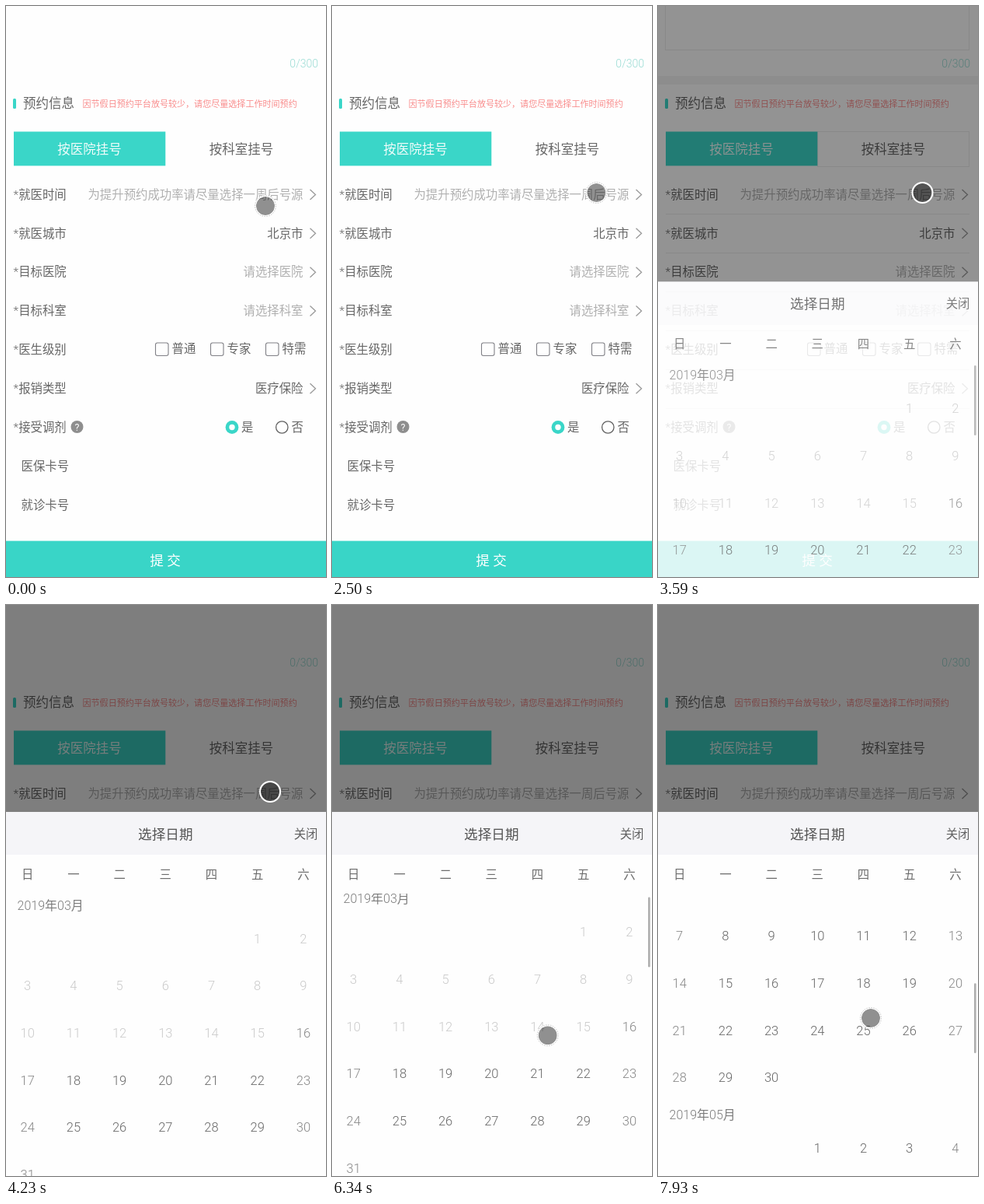
These frames come from a looping animation (412x734 px, 8000 ms). An HTML page with a canvas:

```html
<!DOCTYPE html>
<html lang="zh-CN">
<head>
<meta charset="utf-8">
<title>预约挂号</title>
<style>
html, body { margin: 0; width: 100%; height: 100%; overflow: hidden; background: #fefefe; }
canvas { display: block; width: 412px; height: 734px; }
</style>
</head>
<body>
<canvas id="stage"></canvas>
<script>
const W = 412, H = 734, LOOP = 8000, STEP = 132, OPEN = 3440;
const TEAL = '#3ad6c8', INK = '#666', HINT = '#b0b0b0';
const FONT = 'Roboto, "Noto Sans CJK SC Light", "Noto Sans CJK SC", "Noto Sans CJK", sans-serif';
const SHEET_TOP = 266, LIST_TOP = 371, ROW = 60.7, COL = 59.2;

const canvas = document.getElementById('stage');
const ctx = canvas.getContext('2d');
const dpr = window.devicePixelRatio || 1;
canvas.width = W * dpr;
canvas.height = H * dpr;

// Pointer strokes: start, end, x, y
const MOVES = [
  [1020, 1290, 369, 281],
  [2010, 2512, 340.5, 240],
  [4230, 5290, 233, 525],
  [5290, 5790, 262, 576],
  [6080, 7000, 294, 462],
  [7000, 7270, 300, 400],
  [7400, 7930, 274, 531]
];

// Title, first weekday, day count, first selectable day
const MONTHS = [['2019年03月', 5, 31, 16], ['2019年04月', 1, 30, 1], ['2019年05月', 3, 31, 1]];

const progress = (t, from, to) => Math.min(1, Math.max(0, (t - from) / (to - from)));
const easeOut = k => 1 - (1 - k) ** 2;
const smooth = k => k * k * (3 - 2 * k);

function pointerAt(t) {
  let x = 334, y = 257;
  for (const [from, to, tx, ty] of MOVES) {
    const k = progress(t, from, to);
    x += (tx - x) * easeOut(k);
    y += (ty - y) * smooth(k);
  }
  return [x, y];
}

// A slow drag, then a fling that settles
function scrollAt(t) {
  const drag = 60 * Math.max(0, (Math.min(t, 7120) - 6100) / 900) ** 1.5;
  return drag + (458 - drag) * easeOut(progress(t, 7120, 7800));
}

// y is the optical middle of the line
function text(str, x, y, size, color, align = 'left', weight = 300) {
  ctx.font = `${weight} ${size}px ${FONT}`;
  ctx.textAlign = align;
  ctx.fillStyle = color;
  ctx.fillText(str, x, y + size * 0.37);
}

function rect(x, y, w, h, color) {
  ctx.fillStyle = color;
  ctx.fillRect(x, y, w, h);
}

function disc(x, y, r, color) {
  ctx.beginPath();
  ctx.arc(x, y, r, 0, Math.PI * 2);
  ctx.fillStyle = color;
  ctx.fill();
}

function ring(x, y, r, color, width) {
  ctx.beginPath();
  ctx.arc(x, y, r, 0, Math.PI * 2);
  ctx.strokeStyle = color;
  ctx.lineWidth = width;
  ctx.stroke();
}

function roundRect(x, y, w, h, r) {
  ctx.beginPath();
  ctx.moveTo(x + r, y);
  ctx.arcTo(x + w, y, x + w, y + h, r);
  ctx.arcTo(x + w, y + h, x, y + h, r);
  ctx.arcTo(x, y + h, x, y, r);
  ctx.arcTo(x, y, x + w, y, r);
  ctx.closePath();
}

function chevron(y) {
  ctx.beginPath();
  ctx.moveTo(391.5, y - 6.5);
  ctx.lineTo(398.5, y);
  ctx.lineTo(391.5, y + 6.5);
  ctx.strokeStyle = '#999';
  ctx.lineWidth = 1.3;
  ctx.stroke();
}

function drawRules() {
  const line = '#ebebeb';
  rect(0, 90, W, 11, '#f4f4f4');
  ctx.strokeStyle = line;
  ctx.lineWidth = 1;
  ctx.strokeRect(9.5, -5.5, 391, 62);
  ctx.strokeRect(205.5, 161.5, 195, 45);
  for (let i = 0; i < 6; i++) rect(10, Math.round(266.5 + i * 50), 391, 1, line);
}

function drawForm(ruled) {
  rect(0, 0, W, H, '#fefefe');
  if (ruled) drawRules();

  text('0/300', 402, 74, 14, '#9adcd4', 'right');
  roundRect(9, 119, 4, 13, 1.5);
  ctx.fillStyle = TEAL;
  ctx.fill();
  text('预约信息', 22, 125, 16.5, INK);
  text('因节假日预约平台放号较少，请您尽量选择工作时间预约', 98.5, 125.5, 11.05, '#f98c8c');

  rect(10, 161.5, 195.3, 43.9, TEAL);
  text('按医院挂号', 107.5, 184, 16.5, '#f0fcfa', 'center');
  text('按科室挂号', 303, 184, 16.5, INK, 'center');

  const rows = [
    ['就医时间', '为提升预约成功率请尽量选择一周后号源', HINT],
    ['就医城市', '北京市', INK],
    ['目标医院', '请选择医院', HINT],
    ['目标科室', '请选择科室', HINT],
    ['医生级别'],
    ['报销类型', '医疗保险', INK],
    ['接受调剂']
  ];
  rows.forEach(([label, value, color], i) => {
    const y = 242 + i * 49.85;
    text('*' + label, 9.6, y, 15.4, INK);
    if (!value) return;
    text(value, 382.5, y, 15.4, color, 'right');
    chevron(y + 0.5);
  });

  ['普通', '专家', '特需'].forEach((label, i) => {
    const x = 192.5 + i * 71;
    roundRect(x, 433, 16.5, 16.5, 2.5);
    ctx.strokeStyle = '#808086';
    ctx.lineWidth = 1.1;
    ctx.stroke();
    text(label, x + 21, 440.5, 15.4, INK);
  });

  disc(91.5, 541, 8, '#8e8e8e');
  text('?', 91.5, 541, 12.5, '#fff', 'center', 400);
  disc(291, 541.5, 8.4, TEAL);
  disc(291, 541.5, 3.7, '#fff');
  ring(355.3, 541.5, 7.7, '#606060', 1.3);
  text('是', 303, 541, 15.4, INK);
  text('否', 367.5, 541, 15.4, INK);

  text('医保卡号', 19.5, 591, 15.4, INK);
  text('就诊卡号', 19.5, 641, 15.4, INK);
  rect(0, 687.6, W, 47, '#39d5c7');
  text('提 交', 205, 712, 17.6, '#fff', 'center', 400);
}

function drawMonths(scroll) {
  let y = 386 - scroll;
  for (const [title, first, days, open] of MONTHS) {
    text(title, 14.5, y, 16, '#7c7c7c');
    y += 42.5;
    for (let d = 1; d <= days; d++) {
      const cell = first + d - 1, col = cell % 7;
      const color = d < open ? '#cacaca' : col % 6 ? '#666' : '#868686';
      text(d, 27.7 + col * COL, y + Math.floor(cell / 7) * ROW, 16.5, color, 'center');
    }
    y += Math.floor((first + days - 1) / 7) * ROW + 48;
  }
}

function drawSheet(t) {
  const fade = progress(t, OPEN, OPEN + 264);
  const slide = 294.5 * (1 - progress(t, OPEN, OPEN + 400)) ** 3;
  const top = SHEET_TOP + slide;
  const scroll = scrollAt(t);

  rect(0, 0, W, top, `rgba(0,0,0,${0.35 + 0.15 * fade})`);
  ctx.save();
  ctx.globalAlpha = 0.65 + 0.35 * fade;
  ctx.translate(0, slide);
  rect(0, SHEET_TOP, W, H - SHEET_TOP, '#fefefe');
  ctx.fillStyle = `rgba(245,245,248,${fade})`;
  ctx.fillRect(0, SHEET_TOP, W, 55);
  text('选择日期', 205.3, 294, 17.6, '#555', 'center');
  text('关闭', 401.5, 294, 15.4, '#606060', 'right');
  [...'日一二三四五六'].forEach((day, i) =>
    text(day, 27.7 + i * COL, 346, 15.4, '#6c6c6c', 'center'));

  ctx.save();
  ctx.beginPath();
  ctx.rect(0, LIST_TOP, W, H - LIST_TOP);
  ctx.clip();
  drawMonths(scroll);
  ctx.restore();

  if (slide > 0 || scroll > 0) {
    roundRect(407, 373.5 + scroll * 0.246, 2.6, 90, 1.3);
    ctx.fillStyle = '#aeaeae';
    ctx.fill();
  }
  ctx.restore();
  return top;
}

function drawPointer(t, sheetTop) {
  const [x, y] = pointerAt(t);
  disc(x, y, 12, 'rgba(0,0,0,.43)');
  ring(x, y, 13, '#fff', 2);
  if (y < sheetTop) return;
  ctx.setLineDash([1.5, 1.5]);
  ring(x, y, 13.4, '#b0b0b0', 0.8);
  ctx.setLineDash([]);
}

function draw(now) {
  // The screen refreshes in even steps, aligned with the sheet opening.
  const t = OPEN + STEP * Math.floor((now % LOOP - OPEN + 18) / STEP);
  const open = t >= OPEN;
  ctx.setTransform(dpr, 0, 0, dpr, 0, 0);
  drawForm(open && t < OPEN + 264);
  drawPointer(t, open ? drawSheet(t) : 0);
}

const start = performance.now();
function frame() {
  draw(performance.now() - start);
  requestAnimationFrame(frame);
}
frame();
</script>
</body>
</html>
```
